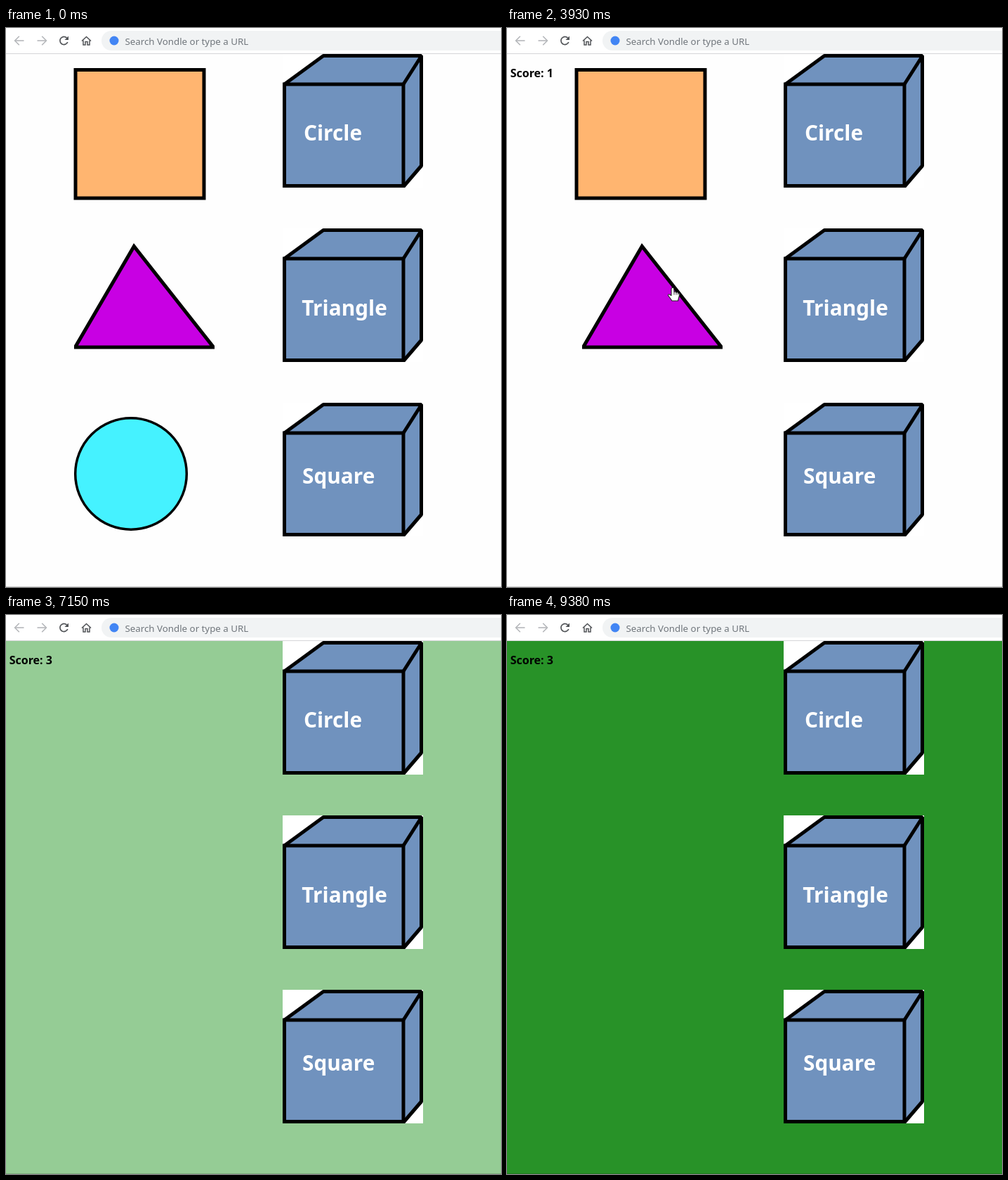
Animation of 705x795 px, one loop 9840 ms. Source, as an HTML page with a canvas:

```html
<!DOCTYPE html>
<html lang="en">
<head>
<meta charset="utf-8">
<title>Shape sorting game</title>
<style>
  html, body { margin: 0; width: 100%; height: 100%; overflow: hidden; background: #fff; }
  canvas { display: block; width: 705px; height: 795px; }
</style>
</head>
<body>
<canvas id="stage" width="705" height="795"></canvas>
<script>
const ctx = document.getElementById('stage').getContext('2d');
const LOOP = 9840;
const TICK = 1000 / 13;
const FONT = '"Noto Sans", "Open Sans", sans-serif';

// Pointer gestures: the points of each are evenly spaced in time.
const GESTURES = [
  { from: 70, to: 980, path: [[575, 770], [215, 400], [408, 152]] },
  { from: 1060, to: 1930, path: [[408, 152], [222, 470]] },
  { from: 2190, to: 3160, path: [[222, 470], [205, 566], [250, 501], [503, 110]] },
  { from: 3240, to: 4160, path: [[503, 110], [300, 400], [202, 600], [236, 369], [232, 380]] },
  { from: 4160, to: 4410, path: [[232, 380], [551, 377]] },
  { from: 4660, to: 5580, path: [[551, 377], [340, 245], [215, 167], [240, 458], [423, 614]] },
  { from: 5580, to: 5980, path: [[423, 614], [470, 639], [462, 627]] },
  { from: 6220, to: 7000, path: [[462, 627], [-40, 650]] }
];

const WRONG = { from: 525, to: 1060 };
const SHAPES = [
  { home: [97, 57, 187, 187], drag: { from: 5120, to: 6220 }, draw: drawSquare },
  { home: [97, 305, 210, 152], drag: { from: 4160, to: 4660 }, draw: drawTriangle, tried: true },
  { home: [97, 553, 162, 162], drag: { from: 2514, to: 3160 }, draw: drawCircle }
];
const [SQUARE, TRIANGLE, CIRCLE] = SHAPES;
const LABELS = [['Circle', 424, 160], ['Triangle', 421.3, 409], ['Square', 422, 647.5]];

const active = (t, span) => t >= span.from && t < span.to;
const lerp = (a, b, k) => a + (b - a) * k;

function gestureAt(t) {
  return GESTURES.filter(g => t >= g.from).pop() || GESTURES[0];
}

// Pointer moves reach the screen in even steps within a gesture.
function stepTime(t) {
  const { from, to } = gestureAt(t);
  const count = Math.round((to - from) / TICK);
  const k = Math.floor((t - from) / (to - from) * count + 1e-6) / count;
  return lerp(from, to, Math.min(1, Math.max(0, k)));
}

function pointerAt(t) {
  const { from, to, path } = gestureAt(t);
  const last = path.length - 1;
  const pos = Math.min(1, Math.max(0, (t - from) / (to - from))) * last;
  const i = Math.min(last - 1, Math.floor(pos));
  return path[i].map((v, axis) => lerp(v, path[i + 1][axis], pos - i));
}

function dragOffset(t, drag) {
  if (!active(t, drag)) return [0, 0];
  const grab = pointerAt(drag.from);
  const now = pointerAt(Math.max(drag.from, stepTime(t)));
  return [now[0] - grab[0], now[1] - grab[1]];
}

function shapeOffset(t, shape) {
  if (!shape.tried) return dragOffset(t, shape.drag);
  if (t < WRONG.to) return dragOffset(t, WRONG);
  // Glide back after the wrong drop, resting a little right of the start.
  const k = Math.min(1, (t - WRONG.to) / 500);
  const left = (1 + Math.cos(Math.PI * k)) / 2;
  const [dx, dy] = dragOffset(t, shape.drag);
  return [lerp(10, 193, left) + dx, -248 * left + dy];
}

function poly(points, close = true) {
  ctx.beginPath();
  points.forEach(([x, y]) => ctx.lineTo(x, y));
  if (close) ctx.closePath();
}

function paint(fill, stroke, width) {
  if (fill) { ctx.fillStyle = fill; ctx.fill(); }
  if (stroke) { ctx.strokeStyle = stroke; ctx.lineWidth = width; ctx.stroke(); }
}

function line(points, color, width) {
  poly(points, false);
  paint(null, color, width);
}

function disc(x, y, r, fill, stroke, width) {
  ctx.beginPath();
  ctx.arc(x, y, r, 0, Math.PI * 2);
  paint(fill, stroke, width);
}

function text(str, x, y, font, color) {
  ctx.font = font + ' ' + FONT;
  ctx.fillStyle = color;
  ctx.fillText(str, x, y);
}

function at([x, y], draw) {
  ctx.save();
  ctx.translate(x, y);
  draw();
  ctx.restore();
}

function drawSquare() {
  ctx.beginPath();
  ctx.rect(99, 59.5, 183, 182.5);
  paint('#ffb570', '#000', 5);
}

function drawTriangle() {
  ctx.beginPath();
  ctx.rect(97, 300, 200, 157);
  ctx.clip();
  poly([[98.5, 454], [182.3, 310.5], [295.5, 454]]);
  paint('#c800e3', '#000', 5);
}

function drawCircle() {
  disc(178, 634, 79.3, '#45f2ff', '#000', 3.5);
}

function drawBox() {
  ctx.fillStyle = '#fff';
  ctx.fillRect(394, 37, 200, 190);
  ctx.lineJoin = 'bevel';
  poly([[396.5, 80], [452, 39.5], [591.5, 39.5], [591.5, 196], [567, 224.5], [396.5, 224.5]]);
  paint('#7092be', '#000', 5);
  ctx.lineJoin = 'miter';
  ctx.beginPath();
  ctx.rect(396.5, 80, 169.5, 144.5);
  paint(null, '#000', 5);
  line([[566, 80], [591.5, 40]], '#000', 5);
}

function drawCross() {
  line([[447, 141.5], [510, 203]], '#f00', 10);
  line([[510, 140], [447, 203]], '#f00', 10);
}

function drawHand() {
  ctx.lineJoin = 'round';
  ctx.beginPath();
  ctx.moveTo(-2, 1.5);
  ctx.quadraticCurveTo(0, -1, 1.7, 1.5);
  ctx.lineTo(2, 6.5);
  ctx.quadraticCurveTo(4, 5.2, 5, 7.2);
  ctx.quadraticCurveTo(7, 6, 7.7, 8);
  ctx.quadraticCurveTo(9.5, 7.5, 9.8, 10);
  ctx.lineTo(7.5, 19);
  ctx.lineTo(-1, 19);
  ctx.quadraticCurveTo(-3.5, 15, -6.5, 11.5);
  ctx.quadraticCurveTo(-6.5, 8, -2, 11.5);
  ctx.closePath();
  paint('#fff', '#222', 1.1);
  for (const x of [2, 5, 7.7]) line([[x, 7], [x, 10.5]], '#222', 0.9);
}

function drawArrow() {
  poly([[0, 0], [0, 16.5], [3.7, 13], [6.3, 19], [9, 17.8], [6.5, 12], [11.5, 11.8]]);
  paint('#fff', '#222', 1.1);
}

function drawPointer(t) {
  if (t < GESTURES[0].from) return;
  const [x, y] = pointerAt(stepTime(t));
  const pressed = [WRONG, ...SHAPES.map(s => s.drag)].some(d => active(t, d));
  const hover = SHAPES.some(({ home: [left, top, w, h], drag }) =>
    t < drag.to && x > left && x < left + w && y > top && y < top + h);
  if (pressed) disc(x, y - 1, 12, 'rgba(255,236,0,.6)');
  at([x, y], pressed || hover ? drawHand : drawArrow);
}

function navArrow(x, dir) {
  line([[x - 6.5 * dir, 18], [x + 6 * dir, 18]], '#b5b7ba', 1.6);
  line([[x + 0.2 * dir, 11.8], [x + 6.4 * dir, 18], [x + 0.2 * dir, 24.2]], '#b5b7ba', 1.6);
}

function drawToolbar() {
  const dark = '#505357';
  ctx.fillStyle = '#fff';
  ctx.fillRect(0, 0, 705, 36);
  ctx.fillStyle = '#d5d6d8';
  ctx.fillRect(0, 36, 705, 1);
  navArrow(19, -1);
  navArrow(51, 1);

  ctx.beginPath();
  ctx.arc(82.5, 18, 5.6, 0.35, Math.PI * 1.75);
  paint(null, dark, 1.7);
  poly([[89, 11.5], [89, 17], [83.5, 17]]);
  paint(dark);

  line([[108, 18.5], [114.5, 12.5], [121, 18.5]], dark, 1.6);
  line([[110, 17.5], [110, 24], [113, 24], [113, 19.5], [116, 19.5], [116, 24], [119, 24], [119, 17.5]], dark, 1.5);

  ctx.beginPath();
  ctx.roundRect(136, 4, 600, 28, 14);
  paint('#f1f3f4');
  disc(154, 18, 6.5, '#4285f4');
  text('Search Vondle or type a URL', 169.5, 23.5, '13.3px', '#70767c');
}

// Once everything is sorted the page eases out from white to green.
function pageColor(t) {
  if (t < SQUARE.drag.to) return '#fefefe';
  const left = 1 - (t - 6034) / 4046;
  const red = Math.round(lerp(33.5, 254.5, left * left));
  const green = Math.round(lerp(142.5, 260, left * left));
  return `rgb(${red},${Math.min(255, green)},${red})`;
}

function draw(t) {
  ctx.fillStyle = pageColor(t);
  ctx.fillRect(0, 0, 705, 795);
  ctx.fillStyle = 'rgba(0,0,0,.17)';
  ctx.fillRect(0, 794, 705, 1);

  const isSorted = shape => t >= shape.drag.to;
  for (const shape of SHAPES) {
    if (!isSorted(shape)) at(shapeOffset(t, shape), shape.draw);
  }
  LABELS.forEach(([label, x, y], i) => {
    at([0, i * 248], drawBox);
    text(label, x, y, 'bold 29.8px', '#fff');
  });
  if (t >= WRONG.to && !isSorted(CIRCLE)) drawCross();

  const score = SHAPES.filter(isSorted).length;
  if (score) text('Score: ' + score, 4.7, 70, 'bold 16px', '#000');

  drawToolbar();
  drawPointer(t);
}

function tick() {
  draw(performance.now() % LOOP);
  requestAnimationFrame(tick);
}
tick();
</script>
</body>
</html>
```
